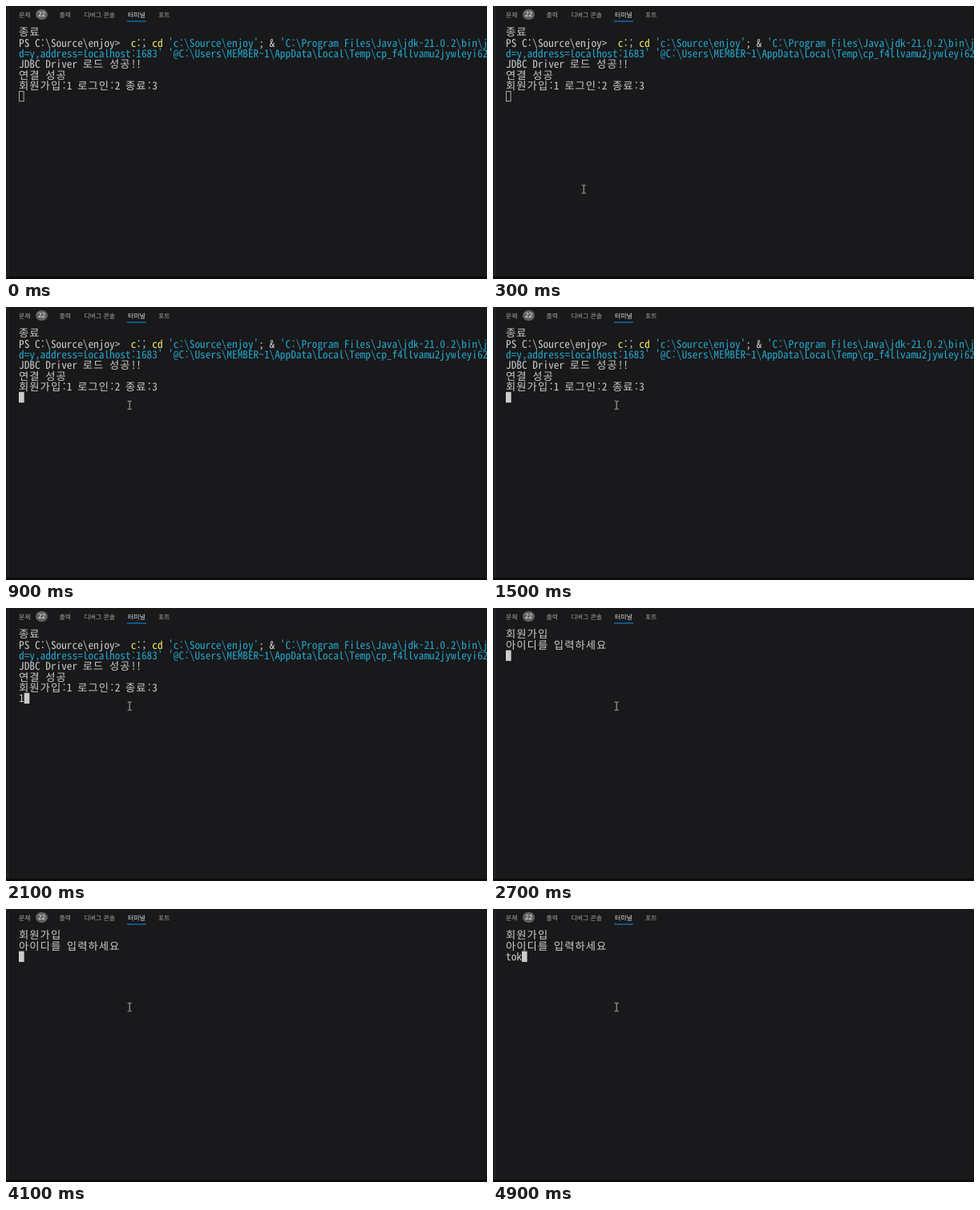
An HTML page that plays this animation: 600 by 340 pixels, repeating every 5000 ms.

```html
<!DOCTYPE html>
<html lang="ko">
<head>
<meta charset="utf-8">
<title>Terminal</title>
<style>
  html, body { margin: 0; width: 100%; height: 100%; overflow: hidden; background: #19181a; }
  svg { display: block; }
  text { text-rendering: geometricPrecision; font-variant-ligatures: none; }
  .tab { font: 7.9px "Noto Sans CJK KR", "Noto Sans", sans-serif; fill: #a6a6a6; }
  .active { fill: #e9e9e9; }
  .badge { font: 8px "Noto Sans", sans-serif; fill: #f8f8f8; text-anchor: middle; }
  .cell { font: 13.3px "Noto Sans Mono CJK KR", "Noto Sans CJK KR", monospace; }
</style>
</head>
<body>
<svg id="stage" width="600" height="340" viewBox="0 0 600 340">
  <rect width="600" height="340" fill="#19181a"/>
  <rect x="2" width="1" height="337" fill="#29282a"/>
  <rect y="337" width="600" height="3" fill="#0e0b0d"/>
  <g class="tab">
    <text x="16" y="13.6">문제</text>
    <text x="66.5" y="13.6">출력</text>
    <text x="97.5" y="13.6">디버그 콘솔</text>
    <text x="152" y="13.6" class="active">터미널</text>
    <text x="190" y="13.6">포트</text>
  </g>
  <rect x="37" y="4" width="15" height="13" rx="6.5" fill="#616161"/>
  <text x="44.5" y="13.4" class="badge">22</text>
  <rect x="151" y="18.4" width="24" height="1.2" fill="#0f7fcf"/>
  <g id="menu" class="cell"></g>
  <g id="signup" class="cell"></g>
  <g id="input" class="cell"></g>
  <rect id="caret" stroke="#a8a8a6"/>
  <path id="pointer" fill="none" stroke="#c8c8c8" stroke-width=".9"
    d="M-2.5-5H-.6L0-4.5 .6-5H2.5M0-4.5V4.5M-2.5 5H-.6L0 4.5 .6 5H2.5"/>
</svg>
<script>
const LOOP = 5000, CELL = 6.65, ROW = 13.3, LEFT = 16, TOP = 26;
const PLAIN = '#cccccc', YELLOW = '#f0ee66', CYAN = '#21a8cd';
const $ = id => document.getElementById(id);
const cellsOf = ch => /[\u3131-\ud7a3]/.test(ch) ? 2 : 1;
const widthOf = text => [...text].reduce((sum, ch) => sum + cellsOf(ch), 0);

// Puts text on the terminal grid; Hangul takes two cells.
function write(parent, row, col, text, color = PLAIN) {
  const node = document.createElementNS('http://www.w3.org/2000/svg', 'text');
  const xs = [];
  for (const ch of text) {
    xs.push((LEFT + col * CELL).toFixed(2));
    col += cellsOf(ch);
  }
  node.setAttribute('x', xs.join(' '));
  node.setAttribute('y', TOP + row * ROW + 11.3);
  node.setAttribute('fill', color);
  node.textContent = text;
  parent.append(node);
}

const menu = $('menu'), signup = $('signup'), input = $('input');
write(menu, 0, 0, '종료');
write(menu, 1, 0, 'PS C:\\Source\\enjoy>');
write(menu, 1, 21, 'c:', YELLOW);
write(menu, 1, 23, ';');
write(menu, 1, 25, 'cd', YELLOW);
write(menu, 1, 28, "'c:\\Source\\enjoy'", CYAN);
write(menu, 1, 45, '; &');
write(menu, 1, 49, "'C:\\Program Files\\Java\\jdk-21.0.2\\bin\\j", CYAN);
write(menu, 2, 0, "d=y,address=localhost:1683' '@C:\\Users\\MEMBER~1\\AppData\\Local\\Temp\\cp_f4llvamu2jywleyi62", CYAN);
write(menu, 3, 0, 'JDBC Driver 로드 성공!!');
write(menu, 4, 0, '연결 성공');
write(menu, 5, 0, '회원가입:1 로그인:2 종료:3');
write(signup, 0, 0, '회원가입');
write(signup, 1, 0, '아이디를 입력하세요');

const SIGNUP_AT = 2700, FOCUS_AT = 700;
// [time, typed text, still being composed]
const typing = [
  [0, ''], [2000, '1'], [2700, ''],
  [3300, 'ㅅ', true], [3500, '새', true], [4000, ''],
  [4600, 't'], [4700, 'to'], [4900, 'tok']
];
// [time, x, y]
const moves = [
  [0, -50, -50], [100, 108, 243], [200, 111, 238], [300, 113.2, 228.2],
  [400, 135, 175], [500, 151, 129], [600, 154.2, 122.2]
];
const stepAt = (steps, t) => steps.findLast(step => step[0] <= t);

function setAttrs(node, attrs) {
  for (const name in attrs) node.setAttribute(name, attrs[name]);
}

let shown;
function draw(t) {
  const onSignup = t >= SIGNUP_AT, focused = t >= FOCUS_AT;
  const row = onSignup ? 2 : 6;
  const step = stepAt(typing, t), [, text, composing] = step;
  menu.style.display = onSignup ? 'none' : '';
  signup.style.display = onSignup ? '' : 'none';
  if (shown !== step) {
    input.replaceChildren();
    write(input, row, 0, text);
    shown = step;
  }
  const x = LEFT + widthOf(text) * CELL, y = TOP + row * ROW;
  setAttrs($('caret'), focused
    ? { x, y, width: CELL, height: ROW, fill: '#cccccc', 'stroke-width': 0 }
    : { x: x + .5, y: y + .5, width: CELL - 1, height: ROW - 1, fill: 'none', 'stroke-width': 1 });
  $('caret').style.display = composing ? 'none' : '';
  const [, px, py] = stepAt(moves, t);
  $('pointer').setAttribute('transform', `translate(${px} ${py})`);
}

const start = performance.now();
function tick() {
  draw((performance.now() - start) % LOOP);
  requestAnimationFrame(tick);
}
tick();
</script>
</body>
</html>
```
